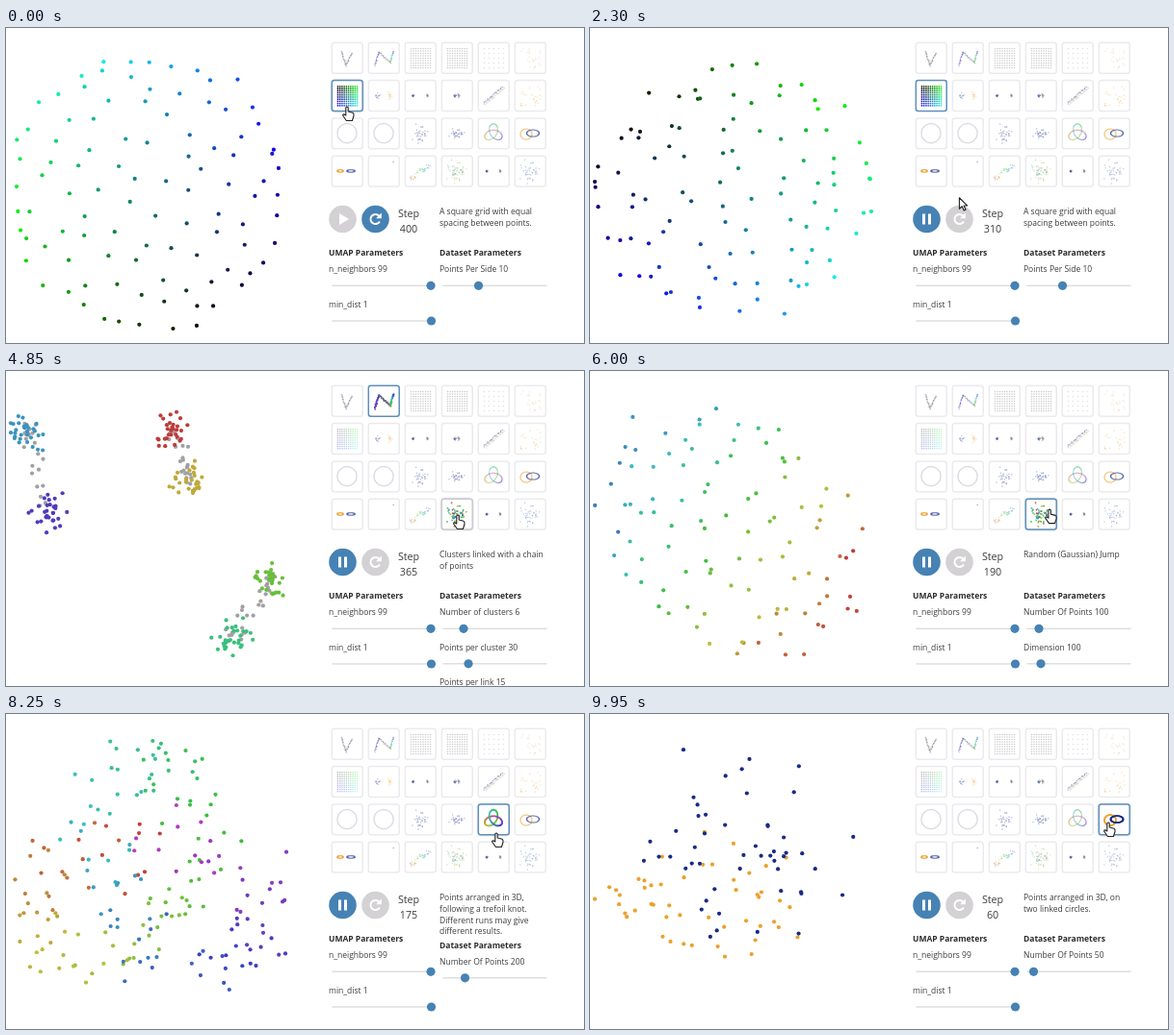
An HTML page with a canvas for the animation above (10000 ms loop, 600x328 px).

```html
<!DOCTYPE html>
<html lang="en">
<head>
<meta charset="utf-8">
<title>UMAP playground</title>
<style>
html, body { margin: 0; height: 100%; overflow: hidden; background: #fff; }
canvas { display: block; }
</style>
</head>
<body>
<canvas id="stage" width="600" height="328"></canvas>
<script>
const ctx = document.getElementById('stage').getContext('2d');
const LOOP = 10000, TICK = 50, STEPS_PER_MS = 0.254, LAST_STEP = 400;
const TAU = Math.PI * 2, BLUE = '#4682b4', NAVY = '#172b85', ORANGE = '#eba12c', GRAY = '#667';

const rand = (i, seed = 0) => {
  const v = Math.sin(i * 127.1 + seed * 311.7 + 4.3) * 43758.5453;
  return v - Math.floor(v);
};
const gauss = (i, seed) => 2 * (rand(i, seed) + rand(i, seed + 50) + rand(i, seed + 100) - 1.5);
const mix = (a, b, f) => a + (b - a) * f;
const mixPoint = (p, q, f) => [mix(p[0], q[0], f), mix(p[1], q[1], f)];
const clamp = (v, low = 0, high = 1) => Math.max(low, Math.min(high, v));
const easeOut = v => 1 - (1 - clamp(v)) ** 3;
const smooth = v => { v = clamp(v); return v * v * (3 - 2 * v); };
const hue = h => `hsl(${h},53%,49%)`;
const blur = ([x, y], i, seed, sx, sy = sx) => [x + gauss(i, seed) * sx, y + gauss(i, seed + 7) * sy];
const ring = (cx, cy, rx, ry, a) => [cx + rx * Math.cos(a), cy + ry * Math.sin(a)];
const trefoil = (cx, cy, size, a) => [
  cx - size * (Math.sin(a) + 2 * Math.sin(2 * a)),
  cy + size * (Math.cos(a) - 2 * Math.cos(2 * a))];

// A 10 x 10 grid rounded into an ellipse, then rotated, with jitter
function discPose(i, angle, rx, ry, seed, jitter) {
  const u = (i % 10) / 4.5 - 1, v = Math.floor(i / 10) / 4.5 - 1;
  const x = rx * u * Math.sqrt(1 - v * v / 2), y = ry * v * Math.sqrt(1 - u * u / 2);
  const cos = Math.cos(angle), sin = Math.sin(angle);
  return [148 + x * cos - y * sin + (rand(i, seed) - 0.5) * jitter,
    170 + x * sin + y * cos + (rand(i, seed + 1) - 0.5) * jitter];
}

// Six linked clusters, which later pair up
const earlyCenters = [[145, 192], [240, 270], [238, 98], [218, 195], [124, 70], [62, 218]];
const lateCenters = [[172, 63], [188, 113], [276, 221], [236, 275], [22, 62], [42, 147]];
const LINKS = 75;
function clusterPose(i, s) {
  const late = smooth((s - 60) / 270);
  const centers = earlyCenters.map((c, n) => mixPoint(c, lateCenters[n], late));
  if (i >= LINKS) return blur(centers[i % 6], i, 1, mix(15, 9.5, late));
  const link = i % 5, f = (Math.floor(i / 5) + 0.5) / 15;
  const bunched = f < 0.5 ? 4 * f ** 3 : 1 - 4 * (1 - f) ** 3;
  const end = link % 2 ? Math.round(f) : f;
  return blur(mixPoint(centers[link], centers[link + 1], mix(bunched, end, late)), i, 1, mix(13, 5, late));
}
function ringPose(i) {
  const a = i * TAU / 50;
  return i < 50 ? blur(ring(112, 196, 75, 42, a), i, 3, 18, 15)
                : blur(ring(160, 140, 55, 52, a), i, 3, 28);
}
const gridColor = i => `rgb(20,${(i % 10) / 9 * 235 | 0},${Math.floor(i / 10) / 9 * 235 | 0})`;

const grid = {
  thumb: 6, count: 100, settle: 280, color: gridColor,
  pose: i => discPose(i, -0.1, 142, 122, 11, 26),
  text: ['A square grid with equal', 'spacing between points.'],
  params: [['Points Per Side 10', 490.5]]
};
const doneGrid = { ...grid, pose: i => discPose(i, 3.58, 142, 140, 21, 16) };
const clusters = {
  thumb: 1, count: LINKS + 180, settle: 60, pose: clusterPose,
  color: i => i < LINKS ? '#a2a0a2' : hue(i % 6 * 50),
  text: ['Clusters linked with a chain', 'of points'],
  params: [['Number of clusters 6', 475], ['Points per cluster 30', 480], ['Points per link 15', 468]]
};
const jump = {
  thumb: 21, count: 100, settle: 330, color: i => hue(i * 2.15),
  pose: i => discPose(i, 2.3, 115, 155, 31, 20),
  text: ['Random (Gaussian) Jump'],
  params: [['Number Of Points 100', 466], ['Dimension 100', 468]]
};
const knot = {
  thumb: 16, count: 200, settle: 175, color: i => hue(i * 1.5), shift: 6.5,
  pose: (i, s) => blur(trefoil(148, 172, 42, i * TAU / 200), i, 41, mix(20, 13, smooth((s - 175) / 225))),
  text: ['Points arranged in 3D,', 'following a trefoil knot.', 'Different runs may give', 'different results.'],
  params: [['Number Of Points 200', 476.5]]
};
const rings = {
  thumb: 17, count: 100, settle: 60, color: i => i < 50 ? ORANGE : NAVY, pose: ringPose,
  text: ['Points arranged in 3D, on', 'two linked circles.'],
  params: [['Number Of Points 50', 460.5]]
};
const runs = [[-5000, doneGrid], [650, grid], [1080, grid], [3100, clusters], [3414, clusters],
  [5250, jump], [7561, knot], [9714, rings]];

function drawDot(x, y, r, color) {
  ctx.fillStyle = color;
  ctx.beginPath();
  ctx.arc(x, y, r, 0, TAU);
  ctx.fill();
}
function drawPlot(set, s, seed) {
  const settled = easeOut(s / set.settle), sway = 3 * (1 - s / LAST_STEP);
  for (let i = 0; i < set.count; i++) {
    const start = [6 + 284 * rand(i, seed), 30 + 282 * rand(i, seed + 1)];
    const [x, y] = mixPoint(start, set.pose(i, s), settled);
    drawDot(clamp(x + sway * Math.sin(s * 0.06 + i), 5, 292),
      clamp(y + sway * Math.cos(s * 0.05 + i * 2), 28, 313), 2.1, set.color(i));
  }
}

// Thumbnail drawings: lists of [[x, y], color] around a centre at 16
const MID = 16;
const dots = (n, place, color) => Array.from({ length: n }, (_, k) => [place(k), color(k)]);
const plain = color => () => color;
const lattice = (n, color) =>
  dots(n * n, k => [6.5 + (k % n) * 20 / (n - 1), 6.5 + Math.floor(k / n) * 20 / (n - 1)], color);
const scatter = (n, seed, color) =>
  dots(n, k => [6 + 21 * rand(k, seed), 6 + 21 * rand(k, seed + 1)], plain(color));
const cloud = (n, sx, sy, color) => dots(n, k => blur([MID, MID], k, 61, sx, sy), color);
const pair = (gap, size, a, b) =>
  dots(24, k => blur([MID + (k % 2 - 0.5) * gap, MID], k, 61, size), k => k % 2 ? b : a);
const loop = (x, y, rx, ry, color) => dots(60, k => ring(x, y, rx, ry, k * TAU / 60), plain(color));
const line = (from, to, color) => dots(24, k => blur(mixPoint(from, to, k / 23), k, 61, 0.4), color);
const thumbs = [
  [...line([15, 24], [10, 9], plain(GRAY)), ...line([15, 24], [21, 11], plain(GRAY))],
  [...line([7, 24], [11, 10], k => hue(260 - k)), ...line([11, 10], [23, 21], plain(GRAY)),
    ...line([23, 21], [26, 9], k => hue(100 + k * 6))],
  lattice(9, plain('#555')),
  lattice(9, plain('#555')),
  lattice(5, plain('#99a')),
  scatter(24, 71, '#d9b98a'),
  lattice(10, gridColor),
  pair(13, 1.5, '#4050a0', ORANGE),
  pair(15, 0.6, NAVY, GRAY),
  pair(4, 0.8, NAVY, GRAY),
  [...line([6, 24], [25, 7], plain(NAVY)), ...line([8, 25], [27, 8], plain('#b9a06a'))],
  scatter(24, 75, ORANGE),
  loop(MID, MID, 10, 10, '#99a'),
  loop(MID, MID, 10, 10, '#99a'),
  cloud(32, 4, 4, plain(NAVY)),
  cloud(32, 4, 2, plain(NAVY)),
  dots(110, k => trefoil(MID, MID, 3.3, k * TAU / 110), k => hue(k * 300 / 110)),
  [...loop(12, 17, 6, 5.5, ORANGE), ...loop(19, 16, 6.5, 3.5, NAVY)],
  [...loop(9, 16, 3, 1.3, ORANGE), ...loop(20, 16, 4, 1.3, '#4858a0')],
  dots(2, k => [26 + k * 0.3, 6.5], plain(GRAY)),
  dots(40, k => blur([6 + k / 2, 23 - k / 3 + 2.5 * Math.sin(k / 4)], k, 61, 1), k => hue(k * 6)),
  cloud(60, 5, 5, k => hue(k * 3.8)),
  pair(14, 0.6, NAVY, GRAY),
  cloud(40, 5, 5, plain('#4860b0'))
];
const SIZE = 32.5;
const corner = i => [338 + (i % 6) * 38, 15 + Math.floor(i / 6) * 39.3];

function drawThumb(i, selected, hovered) {
  ctx.save();
  ctx.translate(...corner(i));
  ctx.beginPath();
  ctx.roundRect(0.3, 0.3, SIZE - 0.6, SIZE - 0.6, 2.5);
  ctx.fillStyle = '#fff';
  if (hovered) { ctx.shadowColor = 'rgba(0,0,0,.3)'; ctx.shadowBlur = 3; }
  ctx.fill();
  ctx.shadowBlur = 0;
  ctx.lineWidth = 1.5;
  ctx.strokeStyle = selected ? '#5f8fba' : hovered ? '#c9c9d0' : '#ebebef';
  ctx.stroke();
  const lit = selected || hovered;
  ctx.globalAlpha = lit ? 0.95 : 0.32;
  for (const [[x, y], color] of thumbs[i]) drawDot(x, y, lit ? 0.9 : 0.75, color);
  ctx.restore();
}

function write(text, x, y, font = '8.5px', color = '#3c3c3c') {
  ctx.font = `${font} "Open Sans", sans-serif`;
  ctx.fillStyle = color;
  ctx.fillText(text, x, y);
}
function drawSlider(label, x, width, y, knob) {
  write(label, x, y);
  ctx.fillStyle = '#dcdcdc';
  ctx.fillRect(x + 3.5, y + 13.6, width, 1.4);
  drawDot(knob, y + 14.3, 4.6, BLUE);
}
function drawButtons(running) {
  drawDot(349.5, 199, 14.3, running ? BLUE : '#d3d1d3');
  drawDot(383.5, 199, 14.3, running ? '#d3d1d3' : BLUE);
  ctx.fillStyle = ctx.strokeStyle = '#fff';
  if (running) {
    ctx.fillRect(345, 193.5, 3, 11);
    ctx.fillRect(351, 193.5, 3, 11);
  } else {
    ctx.fill(new Path2D('M346 193L356 199L346 205Z'));
  }
  ctx.lineWidth = 2;
  ctx.beginPath();
  ctx.arc(383.5, 199, 5, 0.5, 5.5);
  ctx.stroke();
  ctx.fill(new Path2D('M389.8 192.5V198.3H384Z'));
}
function drawPanel(set, s) {
  drawButtons(s < LAST_STEP);
  ctx.textAlign = 'center';
  write('Step', 418, 197, '10.7px');
  write(String(Math.round(s / 5) * 5), 418, 213, '10.7px');
  ctx.textAlign = 'left';
  set.text.forEach((line, n) => write(line, 450, 194 + n * 11.8, '8.5px'));
  write('UMAP Parameters', 335, 237, 'bold 8.5px', '#2c2c2c');
  drawSlider('n_neighbors 99', 335, 102, 254, 441);
  drawSlider('min_dist 1', 335, 102, 290.7, 441.5);
  const shift = set.shift || 0;
  write('Dataset Parameters', 450, 237 + shift, 'bold 8.5px', '#2c2c2c');
  set.params.forEach(([label, knob], n) => drawSlider(label, 450, 108, 254 + shift + n * 36.5, knob));
}

// Pointer moves: start, end, and where it comes to rest
const moves = [[0, 1, 354, 82], [650, 1030, 382, 200], [2100, 2950, 392, 34], [3100, 3400, 382, 201],
  [3950, 4800, 469, 150], [5300, 6800, 487, 137], [7050, 7500, 509, 124], [9150, 9650, 538, 113]];
const arrow = new Path2D('M0 0V11.5L2.8 9L4.8 13.2L6.6 12.4L4.7 8.2H8.2Z');
const hand = new Path2D('M-1.2 .8Q0 -.8 1.2 .8V5L6 6.2Q7.4 7 7 9.5L5.4 14.5H-.6L-4.4 9Q-4.4 6.8 -1.2 9Z');

const pointerAt = t => moves.reduce(
  (at, [start, end, x, y]) => mixPoint(at, [x, y], smooth((t - start) / (end - start))), moves[0].slice(2));

function drawPointer(x, y, shape) {
  ctx.save();
  ctx.translate(x, y);
  ctx.lineWidth = 1.1;
  ctx.lineJoin = 'round';
  ctx.fillStyle = '#fff';
  ctx.strokeStyle = '#222';
  ctx.fill(shape);
  ctx.stroke(shape);
  ctx.restore();
}

function draw(now) {
  const t = Math.floor(now % LOOP / TICK) * TICK;
  const n = runs.findLastIndex(run => run[0] <= t), [start, set] = runs[n];
  const s = Math.min(LAST_STEP, (t - start) * STEPS_PER_MS);
  const [x, y] = pointerAt(t);
  const over = thumbs.findIndex((_, i) => {
    const [left, top] = corner(i);
    return x >= left && x <= left + SIZE + 3 && y >= top && y <= top + SIZE + 3;
  });
  ctx.fillStyle = '#fff';
  ctx.fillRect(0, 0, 600, 328);
  drawPlot(set, s, 200 + n * 2);
  thumbs.forEach((_, i) => drawThumb(i, i === set.thumb, i === over));
  drawPanel(set, s);
  drawPointer(x, y, over < 0 ? arrow : hand);
}
let begin;
function frame(now) {
  begin ??= now;
  draw(now - begin);
  requestAnimationFrame(frame);
}
requestAnimationFrame(frame);
</script>
</body>
</html>
```
